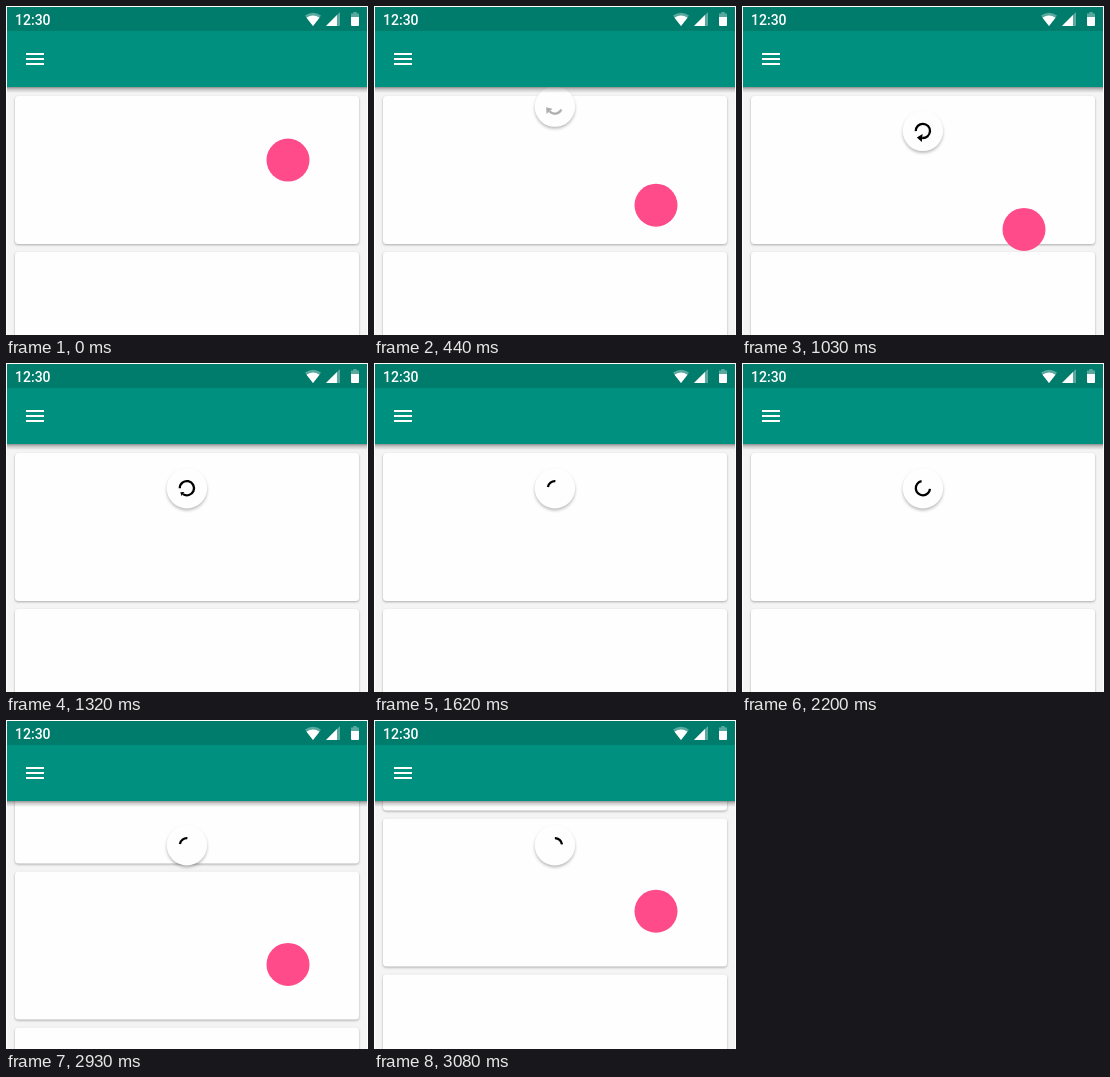
Animation of 362 by 329 pixels, one loop 3180 ms. Source, as an HTML page:

```html
<!DOCTYPE html>
<html lang="en">
<head>
<meta charset="utf-8">
<title>Pull to refresh</title>
<style>
  html, body { margin: 0; width: 100%; height: 100%; overflow: hidden; background: #fff; }
  svg { display: block; width: 362px; height: 329px; }
  .card { fill: #fefefe; filter: drop-shadow(0 1px 1px rgba(0, 0, 0, .3)); }
  .disc { fill: #fefefe; filter: drop-shadow(0 2px 1.5px rgba(0, 0, 0, .26)); }
  .clock { font: 500 14px Roboto, sans-serif; fill: #fff; }
  .dim { fill: #fff; opacity: .35; }
  .lit { fill: #fff; }
  #arc { fill: none; stroke: #000; stroke-width: 2.3; }
</style>
</head>
<body>
<svg viewBox="0 0 362 329">
  <defs>
    <linearGradient id="shade" x1="0" y1="0" x2="0" y2="1">
      <stop offset="0" stop-opacity=".42"/>
      <stop offset=".35" stop-opacity=".2"/>
      <stop offset="1" stop-opacity="0"/>
    </linearGradient>
    <clipPath id="screen"><rect x="1" y="1" width="360" height="328"/></clipPath>
    <rect id="card" class="card" x="9" y="90" width="344" height="148" rx="3.5"/>
  </defs>
  <g clip-path="url(#screen)">
    <rect width="362" height="329" fill="#f4f4f4"/>
    <g id="cards">
      <use href="#card"/>
      <use href="#card" y="156"/>
      <use href="#card" y="312"/>
    </g>
    <g id="spinner">
      <circle class="disc" r="20.2"/>
      <g id="icon">
        <path id="arc"/>
        <path id="arrow" d="M-4 0H4L0 5.3Z"/>
      </g>
    </g>

    <rect y="81" width="362" height="6" fill="url(#shade)"/>
    <rect y="25" width="362" height="56" fill="#009080"/>
    <rect width="362" height="25" fill="#007c6c"/>
    <text class="clock" x="9" y="19.4">12:30</text>

    <path class="dim" d="M307 20L299 9.5Q307 4 315 9.5Z"/>
    <path class="lit" d="M307 20L300.5 11.7Q307 7.3 313.5 11.7Z"/>
    <path class="dim" d="M320 20L334 6V20Z"/>
    <path class="lit" d="M320 20L331 9V20Z"/>
    <path class="dim" d="M345 7.5H347.3V6H350.7V7.5H353V11H345Z"/>
    <path class="lit" d="M345 11H353V19Q353 20 352 20H346Q345 20 345 19Z"/>
    <path class="lit" d="M20 47H38V49H20ZM20 52H38V54H20ZM20 57H38V59H20Z"/>

    <circle id="finger" cx="282" r="21.5" fill="#ff4b89"/>
  </g>
</svg>
<script>
  // All motion is counted in steps; the picture holds still within each one.
  const LOOP = 3180, STEP = 146.7, LEAD = 8;
  const PULL = 70, RELEASE = 9, SPIN = 10, TOUCH = 19;
  const scrollKeys = [[17, 0], [18, -33], [20, -94.4], [21, -147.6]];

  const $ = id => document.getElementById(id);
  const [cards, spinner, icon, arc, arrow, finger] =
    ["cards", "spinner", "icon", "arc", "arrow", "finger"].map($);

  const clamp = (v, lo = 0, hi = 1) => Math.min(hi, Math.max(lo, v));
  const mix = (a, b, u) => a + (b - a) * u;

  // cubic-bezier(.4, 0, .2, 1), solved by bisection
  function ease(x) {
    let lo = 0, hi = 1;
    for (let i = 0; i < 24; i++) {
      const s = (lo + hi) / 2, r = 1 - s;
      if (1.2 * r * r * s + .6 * r * s * s + s ** 3 < x) lo = s; else hi = s;
    }
    return lo * lo * (3 - 2 * lo);
  }

  function scrollAt(k) {
    return scrollKeys.slice(1).reduce((y, [k1, y1], i) => {
      const [k0, y0] = scrollKeys[i];
      return y + (y1 - y0) * clamp((k - k0) / (k1 - k0));
    }, 0);
  }

  function pulledRing(k, pull) {
    const u = (pull - .65) / .35, extra = Math.max(0, k - 7);
    return { tail: mix(25, 180, u), head: mix(140, 460, u) + 12 * extra, tip: 1 - .2 * extra };
  }

  // Steady rotation, with the arc swelling and shrinking once in nine steps
  function spinningRing(k) {
    const u = k - 11, swell = 1 + Math.cos((u - 5) / 9 * 2 * Math.PI);
    return { tail: 195 + 80 * u - 85 * swell, head: 273 + 80 * u + 15 * swell, tip: 0 };
  }

  function point(deg, r) {
    const a = deg * Math.PI / 180;
    return (r * Math.cos(a)).toFixed(2) + " " + (r * Math.sin(a)).toFixed(2);
  }

  function drawRing({ tail, head, tip }) {
    const sweep = head - tail, r = 7.1;
    icon.style.display = sweep > 0 ? "" : "none";
    arc.setAttribute("d",
      `M${point(tail, r)}A${r} ${r} 0 ${sweep > 180 ? 1 : 0} 1 ${point(head, r)}`);
    arrow.setAttribute("transform", `rotate(${head}) translate(${r} 0) scale(${tip})`);
  }

  function draw(now) {
    const k = Math.floor((now % LOOP + LEAD) / STEP);
    const pull = ease(clamp((k + .4) / 8.13)), scroll = scrollAt(k);
    cards.setAttribute("transform", `translate(0 ${scroll})`);
    spinner.setAttribute("transform", `translate(180.9 ${55.2 + PULL * pull})`);
    icon.setAttribute("opacity", clamp(.3 + .35 * (k - 4), .3));
    drawRing(k < SPIN ? pulledRing(k, pull) : spinningRing(k));
    finger.style.display = k < RELEASE || k >= TOUCH ? "" : "none";
    finger.setAttribute("cy", k < RELEASE ? 153.7 + PULL * pull : 338.8 + scroll);
  }

  const start = performance.now();
  function frame() {
    draw(performance.now() - start);
    requestAnimationFrame(frame);
  }
  frame();
</script>
</body>
</html>
```
